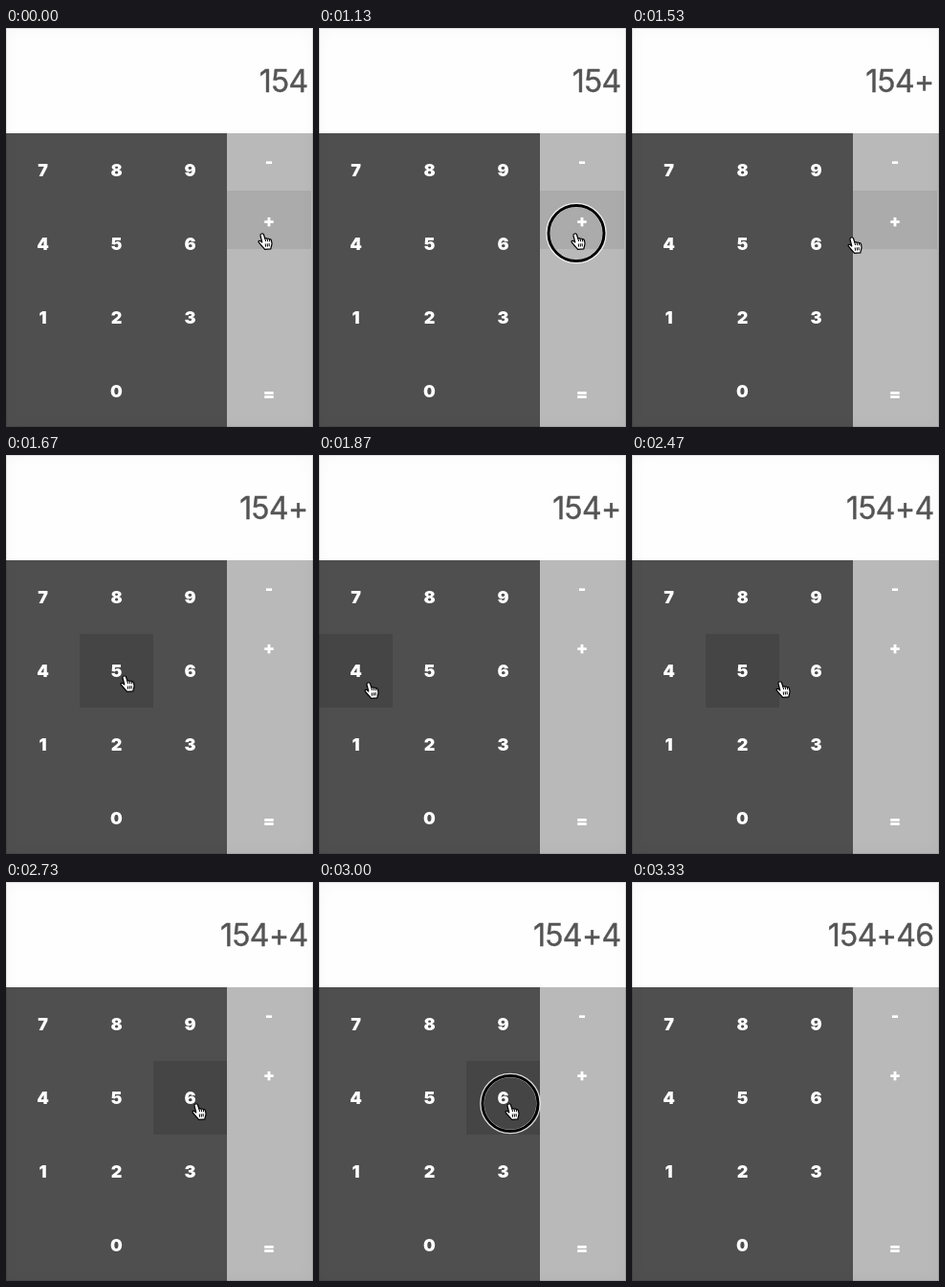
An HTML page for the animation above (3.67 s loop, 321x417 px).

```html
<!DOCTYPE html>
<html lang="en">
<head>
<meta charset="utf-8">
<title>Calculator</title>
<style>
  html, body { margin: 0; width: 100%; height: 100%; overflow: hidden; background: #fefefe; }
  svg { display: block; width: 321px; height: 417px; }
  text { font-family: Inter, Roboto, sans-serif; }
  #display { font-size: 32px; letter-spacing: -.6px; fill: #555; stroke: #555; stroke-width: .4px; text-anchor: end; }
  #keys text { font-size: 18px; font-weight: 900; fill: #fff; text-anchor: middle; }
  .edge { position: fixed; left: 0; top: 0; width: 321px; height: 417px;
    box-shadow: inset 0 0 0 1px rgba(0,0,0,.1), inset 0 0 16px rgba(0,0,0,.035); }
</style>
</head>
<body>
<svg viewBox="0 0 321 417">
  <rect width="321" height="417" fill="#fefefe"/>
  <rect y="110" width="231" height="307" fill="#4f4f4f"/>
  <rect x="231" y="110" width="90" height="307" fill="#b9b9b9"/>
  <rect id="hover"/>
  <g id="keys"></g>
  <text id="display" x="315.6" y="67"></text>
  <g id="cursor">
    <g id="ring" fill="none">
      <circle cx="6" cy=".5" r="29.5" stroke="#fff" stroke-width="4.6" stroke-opacity=".8"/>
      <circle cx="6" cy=".5" r="29" stroke="#000" stroke-width="3"/>
    </g>
    <path fill="#fff" stroke="#000" stroke-width="1.2" stroke-linejoin="round"
      d="M4.2 1C5.3.6 6.2 1 6.6 2.2L7.8 6C8.4 5.3 9.7 5.4 10.1 6.4C10.7 5.7 11.9 5.9 12.3 6.9C13.1 6.4 14.2 6.9 14.5 8.2L15 11C15.2 13 14.1 14 13.9 16.8L7.4 17.3C6.8 16 4.8 14.6 3.5 12.6L1.3 10C.4 8.8 1.8 7.8 2.9 8.6L4.8 10L3 3C2.8 2 3.3 1.2 4.2 1Z"/>
    <path fill="none" stroke="#000" d="M7.8 6l.8 3M10.1 6.4l.6 2.8M12.3 6.9l.5 2.5M8.2 11.5l.4 3.2M10.2 11.3l.3 3.2M12.1 11.1l.2 3.2"/>
  </g>
</svg>
<div class="edge"></div>
<script>
const LOOP = 3670;
const $ = id => document.getElementById(id);
const boxes = {};

function addKey(label, x, y, width, height, textX, baseline, fill = '#454545') {
  boxes[label] = { x, y, width, height, fill };
  const t = document.createElementNS('http://www.w3.org/2000/svg', 'text');
  t.textContent = label;
  t.setAttribute('x', textX);
  t.setAttribute('y', baseline);
  $('keys').append(t);
}

['789', '456', '123', ' 0 '].forEach((row, r) => [...row].forEach((label, c) => {
  if (label !== ' ') addKey(label, c * 77, 110 + r * 77, 77, 77, c * 77 + 38.5, 155 + r * 77);
}));
addKey('-', 231, 110, 88, 60, 275, 146, '#ababab');
addKey('+', 231, 170, 88, 61, 275, 207.5, '#ababab');
addKey('=', 231, 341, 88, 76, 275, 388.5, '#ababab');

// start time, cursor x, cursor y, hovered key
const moves = [
  [0, 263, 214, '+'],
  [1530, 225, 218, '+'], [1600, 171, 224, '6'], [1670, 119, 230, '5'], [1730, 83, 234, '5'],
  [1800, 59, 236, '4'], [1870, 47, 237, '4'], [1930, 44, 238, '4'], [2000, 43, 238, '4'],
  [2330, 66, 238, '4'], [2400, 107, 237, '5'], [2470, 150, 236, '5'], [2530, 179, 235, '6'],
  [2600, 187, 234, '6'], [2670, 192, 232, '6'], [2730, 194, 231, '6'],
  [3270, 267, 180, '+'], [3330]
];
const clicks = [[1130, 1270], [2070, 2200], [2930, 3070]];
const entries = [[0, '154'], [1270, '154+'], [2200, '154+4'], [3070, '154+46']];

const at = (list, t) => list.findLast(step => step[0] <= t);
const show = (el, on) => el.setAttribute('visibility', on ? 'visible' : 'hidden');

function draw(t) {
  const [, x, y, key] = at(moves, t);
  show($('hover'), key);
  show($('cursor'), key);
  show($('ring'), key && clicks.some(([from, to]) => t >= from && t < to));
  if (key) {
    $('cursor').setAttribute('transform', `translate(${x} ${y})`);
    for (const [name, value] of Object.entries(boxes[key])) $('hover').setAttribute(name, value);
  }
  $('display').textContent = at(entries, t)[1];
}

const start = performance.now();
function tick() {
  draw((performance.now() - start) % LOOP);
  requestAnimationFrame(tick);
}
tick();
</script>
</body>
</html>
```
